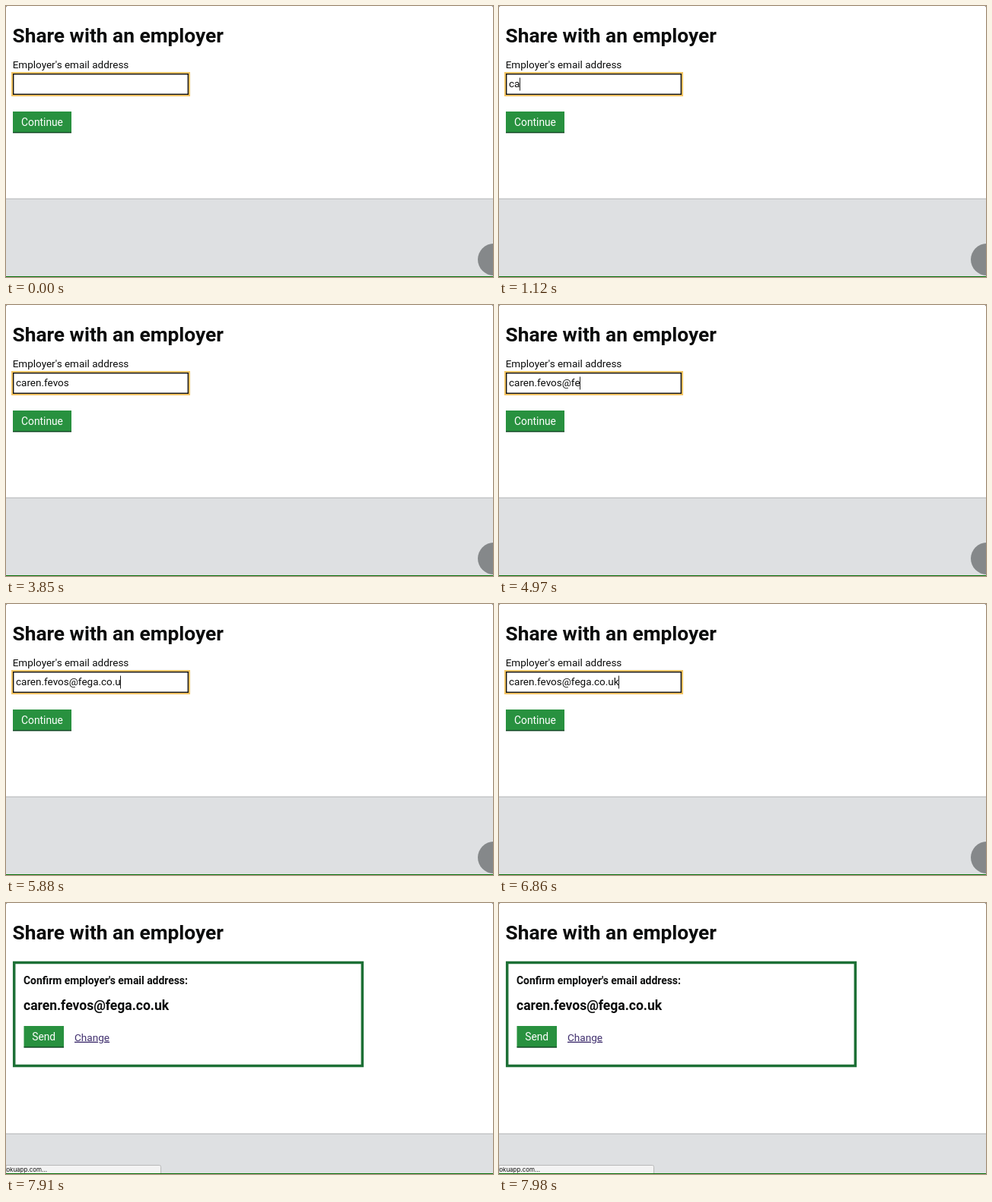
An HTML page that plays this animation: 640 by 357 pixels, repeating every 8 s.

```html
<!DOCTYPE html>
<html lang="en">
<head>
<meta charset="utf-8">
<title>Share with an employer</title>
<style>
  html, body { margin: 0; width: 100%; height: 100%; overflow: hidden; background: #555; }
  svg { display: block; width: 100%; height: 100%; }
  text { font: 13.5px Roboto, sans-serif; fill: #0b0c0c; }
  .bold { font-weight: 700; font-size: 13.9px; }
  .address { font-weight: 700; font-size: 17.5px; }
  .title { font-weight: 700; font-size: 26.3px; }
  .label { font-size: 13.8px; fill: #fff; text-anchor: middle; }
  .link { font-size: 13.6px; fill: #41306f; text-decoration: underline; }
  .status { font: 8px Inter, sans-serif; fill: #111; text-anchor: end; }
  .button { fill: #28913f; }
  .edge { fill: #0d4420; }
  .focus { fill: #f3c464; }
</style>
</head>
<body>
<svg viewBox="0 0 640 357" preserveAspectRatio="none">
  <rect width="640" height="360" rx="2" fill="#fff"/>
  <text class="title" x="8.5" y="48">Share with an employer</text>

  <g id="footer">
    <rect y="254" width="640" height="110" fill="#dee0e2"/>
    <rect y="253.5" width="640" height="1" fill="#b1b4b6"/>
    <circle cx="641" cy="334" r="21" fill="#85888a"/>
  </g>

  <g id="form">
    <text x="8.7" y="81.5">Employer's email address</text>
    <rect id="fieldFocus" class="focus" x="7" y="87" width="235" height="32"/>
    <rect x="9.7" y="89.7" width="229.6" height="26.6" fill="#fff" stroke="#111" stroke-width="1.4"/>
    <text id="typed" x="13" y="106.5"></text>
    <rect id="caret" y="94.5" width="1" height="17" fill="#222"/>
    <rect id="buttonFocus" class="focus" x="7" y="137" width="81" height="31.7"/>
    <rect id="button" class="button" x="9" y="139" width="77" height="28"/>
    <rect class="edge" x="9" y="166" width="77" height="1.4"/>
    <text class="label" x="47.5" y="157.7">Continue</text>
  </g>

  <g id="confirm">
    <rect x="10.7" y="78.5" width="457.6" height="136" fill="none" stroke="#1d7036" stroke-width="3.5"/>
    <text class="bold" x="23" y="107">Confirm employer's email address:</text>
    <text id="address" class="address" x="23" y="141"></text>
    <rect class="button" x="23.5" y="162" width="52.5" height="28"/>
    <rect class="edge" x="23.5" y="189.3" width="52.5" height="1.4"/>
    <text class="label" x="49.7" y="181">Send</text>
    <text class="link" x="90" y="181.7">Change</text>
  </g>

  <g id="status">
    <path d="M0 345.5H201.5Q203.5 345.5 203.5 347.5V357H0Z" fill="#f3f3f3" stroke="#b8b8b8"/>
    <text class="status" x="54" y="354">rokuapp.com...</text>
  </g>
  <rect y="356" width="640" height="1" fill="#087008"/>
</svg>
<script>
  const el = id => document.getElementById(id);
  const show = (id, on) => el(id).setAttribute('visibility', on ? 'visible' : 'hidden');

  const LOOP = 8000, START = 350, CLICK = 6930, LOADING = 7700, NEXT = 7910;
  const BLINK_ON = 490, BLINK = 770;
  const email = 'caren.fevos@fega.co.uk';
  // time of each key press
  const keys = [980, 1050, 1470, 1680, 1750, 1820, 1960, 2030, 3010, 3150, 3290,
    4480, 4900, 4970, 5110, 5250, 5390, 5530, 5670, 5740, 5880, 6020];

  function draw(t) {
    const count = keys.filter(k => k <= t).length;
    const lastKey = count ? keys[count - 1] : START;
    const focused = t < CLICK, next = t >= NEXT;

    const typed = el('typed');
    typed.textContent = email.slice(0, count);
    el('caret').setAttribute('x', Math.floor(13 + (count ? typed.getComputedTextLength() : 0)));

    el('form').style.display = next ? 'none' : '';
    el('confirm').style.display = next ? '' : 'none';
    show('caret', focused && t >= START && (t - lastKey) % BLINK < BLINK_ON);
    show('fieldFocus', focused);
    show('buttonFocus', !focused);
    el('button').style.fill = focused ? '' : '#1c7236';
    el('footer').setAttribute('transform', `translate(0 ${next ? 50 : 0})`);
    show('status', t >= LOADING);
  }

  function tick(now) {
    draw(now % LOOP);
    requestAnimationFrame(tick);
  }

  el('address').textContent = email;
  draw(0);
  requestAnimationFrame(tick);
</script>
</body>
</html>
```
